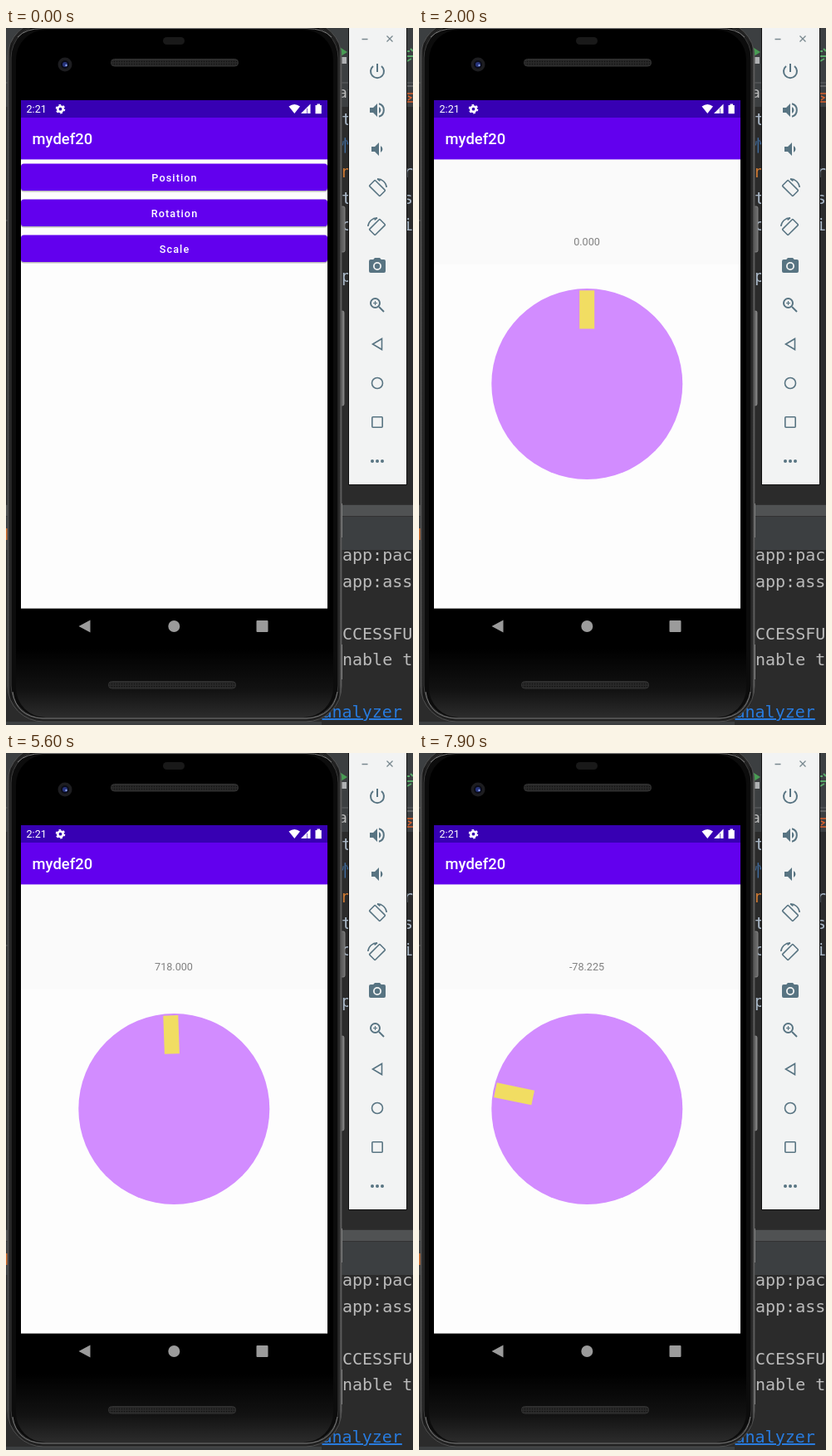
An HTML page that plays this animation: 490x840 px, repeating every 8000 ms.

```html
<!DOCTYPE html>
<html lang="en">
<head>
<meta charset="utf-8">
<title>Phone dial</title>
<style>
html, body { margin: 0; width: 100%; height: 100%; overflow: hidden; background: #2b2b2b; }
svg { display: block; width: 490px; height: 840px; }
text { font-family: Roboto, sans-serif; white-space: pre; }
.code text { font: 20px "DejaVu Sans Mono", monospace; }
.title { font-size: 18.4px; font-weight: 500; fill: #fff; }
.label { font-size: 12.6px; font-weight: 500; letter-spacing: 1.12px; fill: #fff; text-anchor: middle; }
.line { fill: none; stroke: #587482; stroke-width: 2; }
.thin { stroke-width: 1.6; }
</style>
</head>
<body>
<svg viewBox="0 0 490 840">
  <defs>
    <clipPath id="screen"><rect x="18" y="87" width="369" height="656"/></clipPath>
    <clipPath id="pressed"><rect x="18" y="206.5" width="369" height="33" rx="3.5"/></clipPath>
    <linearGradient id="rim">
      <stop offset="0" stop-color="#555"/><stop offset=".008" stop-color="#151515"/>
      <stop offset=".02" stop-color="#222"/><stop offset=".98" stop-color="#222"/>
      <stop offset=".992" stop-color="#161616"/><stop offset="1" stop-color="#777"/>
    </linearGradient>
    <linearGradient id="gloss" x2="0" y2="1">
      <stop offset=".9" stop-color="#000"/><stop offset=".96" stop-color="#121212"/>
      <stop offset="1" stop-color="#2c2c2c"/>
    </linearGradient>
    <pattern id="mesh" width="3" height="3" patternUnits="userSpaceOnUse">
      <rect width="3" height="3" fill="#292929"/><circle cx="1.5" cy="1.5" r=".8" fill="#111"/>
    </pattern>
    <g id="chrome">
      <rect x="18" y="87" width="369" height="21" fill="#3700b3"/>
      <rect x="18" y="108" width="369" height="50.4" fill="#6200ee"/>
      <rect x="18" y="699.6" width="369" height="43.4"/>
      <text class="title" x="31.6" y="140">mydef20</text>
    </g>
  </defs>

  <!-- editor behind the phone -->
  <g class="code">
    <rect width="490" height="840" fill="#2b2b2b"/>
    <rect width="490" height="95" fill="#3c3f41"/>
    <path d="M0 66H490M0 232H4" stroke="#606365"/>
    <path d="M400 22l11 7-11 7z" fill="#499c54"/>
    <rect x="404" y="35" width="6" height="8" fill="#afb1b3"/>
    <rect id="hover" x="483" y="56" width="7" height="39" fill="#4c5052"/>
    <path d="M483 28h3m1-3l3 3m-7 6h7m-7 6l5-3" stroke="#59a869" stroke-width="2"/>
    <path d="M483 70h7" stroke="#888"/>
    <path d="M483 79h7M483 89h7M484 82l4 2-4 3" stroke="#d9602b" stroke-width="1.5" fill="none"/>
    <text x="400" y="84" fill="#bbb" style="font-size:18px">av</text>
    <g fill="#a9b7c6">
      <text x="404" y="117">t</text>
      <text x="404" y="149" fill="#3f6b9d">惟</text>
      <text x="404" y="180" fill="#cc7832">n</text><text x="478" y="180">r</text>
      <text x="404" y="212">t</text><text x="478" y="212">s</text>
      <text x="404" y="244">c</text><text x="478" y="244">i</text>
      <text x="404" y="306">p</text>
    </g>
    <path d="M482 95v314" stroke="#3a3a3a" stroke-width="2"/>
    <rect y="574" width="490" height="14" fill="#505253"/>
    <rect y="588" width="490" height="41" fill="#3c3f41"/>
    <path d="M0 574.5H490M0 588.5H490" stroke="#323232"/>
    <path d="M404.5 573v41M404.5 743v42" stroke="#aaa"/>
    <g fill="#bbb">
      <text x="405" y="642">app:pac</text>
      <text x="405" y="674">app:ass</text>
      <text x="405" y="737">CCESSFU</text>
      <text x="405" y="768">nable t</text>
      <text x="380.5" y="831" fill="#287bde" text-decoration="underline">analyzer</text>
    </g>
    <rect y="836" width="380" height="4" fill="#3c3f41"/>
    <rect y="603" width="3" height="14" fill="#cc6a2b"/>
  </g>

  <!-- phone body -->
  <rect x="402" y="215" width="6" height="55" rx="2" fill="#666" stroke="#999" stroke-width=".7"/>
  <rect x="402" y="341" width="5" height="114" rx="2" fill="#777" stroke="#999" stroke-width=".7"/>
  <rect x="2" y="-8" width="402" height="844" rx="43" fill="url(#rim)" stroke="#505050"/>
  <rect x="6" y="-4" width="394" height="836" rx="40" fill="#0c0c0c" stroke="#3c3c3c"/>
  <rect x="12" y="2" width="382" height="829" rx="36" fill="url(#gloss)"/>
  <path d="M8 800Q12 830 44 832H362Q394 830 399 800M14 11Q24 .5 44 .5H362Q382 .5 392 11" fill="none" stroke="#777"/>
  <rect x="189" y="11" width="26" height="9" rx="4.5" fill="#191919"/>
  <circle cx="71" cy="44" r="8.5" fill="#1d1d20"/>
  <circle cx="71" cy="44" r="5" fill="#0b0c18"/>
  <circle cx="71" cy="44" r="3" fill="#27347c"/>
  <circle cx="72.5" cy="45" r="1.2" fill="#8fa5e8"/>
  <g fill="url(#mesh)" stroke="#333">
    <rect x="126.5" y="37.5" width="153" height="8.5" rx="4"/>
    <rect x="123.5" y="787.5" width="153" height="8.5" rx="4"/>
  </g>

  <!-- app screens -->
  <g clip-path="url(#screen)">
    <g id="menu">
      <rect x="18" y="87" width="369" height="656" fill="#fdfdfd"/>
      <use href="#chrome"/>
      <g id="buttons"></g>
      <circle id="ripple" cx="202.5" cy="223" fill="#fff" clip-path="url(#pressed)"/>
    </g>
    <g id="dial">
      <rect x="18" y="87" width="369" height="656" fill="#fdfdfd"/>
      <rect x="18" y="158" width="369" height="127" fill="#fafafa"/>
      <use href="#chrome"/>
      <text id="value" x="202" y="261.5" text-anchor="middle" font-size="12.6" fill="#808080"></text>
      <circle cx="202.3" cy="429" r="115" fill="#d28cff"/>
      <rect id="bar" x="193.2" y="316.3" width="18" height="46.2" fill="#f1dd62"/>
    </g>
  </g>

  <!-- system icons -->
  <g fill="#fff">
    <text x="24.5" y="102.3" font-size="12.6">2:21</text>
    <circle cx="65.5" cy="97.7" r="3.2" fill="none" stroke="#fff" stroke-width="2.6"/>
    <circle cx="65.5" cy="97.7" r="5" fill="none" stroke="#fff" stroke-width="1.6" stroke-dasharray="2.62"/>
    <path d="M340.5 94.5Q347.3 89.5 354 94.5L347.3 103zM355 103L366.5 91.5V103zM372.5 93h2v-1.5h3.5v1.5h1.8v10.3h-7.3z"/>
    <path d="M362.5 97v6" stroke="#7a5bc9"/>
  </g>
  <g fill="#9b9b9b">
    <path d="M87.5 721L101.5 713.5V728.5z"/>
    <circle cx="202.3" cy="721" r="7"/>
    <rect x="301.5" y="714" width="14" height="14" rx="1"/>
  </g>

  <!-- emulator tool strip -->
  <rect x="412.5" y="-1" width="70" height="551.5" fill="#f2f3f3" stroke="#111"/>
  <path d="M428.5 13.5h7M458.5 9.5l7 7m0-7l-7 7" stroke="#78888f" stroke-width="1.3"/>
  <g id="tools" fill="#587482"></g>
</svg>
<script>
const $ = id => document.getElementById(id);

$('buttons').innerHTML = ['Position', 'Rotation', 'Scale'].map((name, i) => {
  const y = 163.5 + 43 * i;
  return `<rect x="18" y="${y + 1}" width="369" height="33" rx="3.5" fill="#bbb"/>
    <rect x="18" y="${y}" width="369" height="32.5" rx="3.5" fill="#6200ee"/>
    <text class="label" x="203" y="${y + 21.5}">${name}</text>`;
}).join('');

// 24-unit icons, stacked 47 px apart
const phoneTilt = `<rect class="line thin" x="7.1" y="3.1" width="9.8" height="17.8" rx="1" transform="rotate(-45 12 12)"/>
  <path class="line thin" d="M12 .8A11.2 11.2 0 0 1 23.2 11M12 .8l3.4 2.6"/>`;
const icons = [
  '<path class="line" d="M12 3v10M7 6A8 8 0 1 0 17 6"/>',
  '<path d="M3 9v6h4l5 5V4L7 9zM14 8v8a4.5 4.5 0 0 0 0-8z"/><path class="line" d="M14 4.3a8 8 0 0 1 0 15.4"/>',
  '<path d="M5 9v6h4l5 5V4L9 9zM16 8v8a4.5 4.5 0 0 0 0-8z"/>',
  phoneTilt,
  `<g transform="matrix(-1 0 0 1 24 0)">${phoneTilt}</g>`,
  '<path d="M9 2L7.2 4H4a2 2 0 0 0-2 2v12a2 2 0 0 0 2 2h16a2 2 0 0 0 2-2V6a2 2 0 0 0-2-2h-3.2L15 2z"/><circle cx="12" cy="12" r="4.1" fill="none" stroke="#f2f3f3" stroke-width="1.8"/>',
  '<circle class="line" cx="9.5" cy="9.5" r="5.5"/><path class="line" d="M14 14l6 6"/><path class="line" style="stroke-width:1.2" d="M7 9.5h5M9.5 7v5"/>',
  '<path class="line thin" d="M6.5 12L17.5 5.5V18.5z"/>',
  '<circle class="line thin" cx="12" cy="12" r="6.5"/>',
  '<rect class="line thin" x="5.8" y="5.8" width="12.4" height="12.4" rx="1"/>',
  '<circle cx="6" cy="12" r="2"/><circle cx="12" cy="12" r="2"/><circle cx="18" cy="12" r="2"/>'
];
$('tools').innerHTML = icons.map((icon, i) => `<g transform="translate(435 ${40 + 47 * i})">${icon}</g>`).join('');

// [time, dial angle]
const turns = [
  [3900, 0], [4000, -.687], [4300, 8], [4400, 8], [4500, 28], [4600, 95], [4700, 190],
  [4800, 305], [4900, 429.27], [5000, 475], [5100, 492], [5200, 492], [5300, 510],
  [5500, 625], [6000, 1090], [6200, 1172.831], [6300, 1110], [6800, -60], [6900, -205],
  [7000, -253.214], [7100, -240.352], [7500, -240.352], [7600, -226], [7800, -118], [7900, -78.225]
];

function angleAt(t) {
  const i = turns.findIndex(([time]) => time >= t);
  if (i < 1) return i ? turns.at(-1)[1] : 0;
  const [t0, a0] = turns[i - 1], [t1, a1] = turns[i];
  return a0 + (a1 - a0) * (t - t0) / (t1 - t0);
}

const zoom = s => `translate(202.5 415) scale(${s}) translate(-202.5 -415)`;

function draw(now) {
  const t = Math.floor(now % 8000 / 100) * 100;
  const step = (t - 1700) / 100;
  const open = step < 0 ? 0 : [.043, .33, .97][step] ?? 1;
  const press = (t - 1300) / 100;

  $('hover').setAttribute('opacity', t >= 100 && t < 300 ? 1 : 0);
  $('ripple').setAttribute('r', Math.max(0, Math.min(190, press * 65)));
  $('ripple').setAttribute('opacity', press < 1 || press > 4 ? 0 : press < 4 ? .2 : .04);
  $('menu').setAttribute('transform', zoom(1 + .15 * open));
  $('dial').setAttribute('transform', zoom(.85 + .15 * open));
  $('dial').setAttribute('opacity', step < 1 ? 0 : step < 2 ? .25 : 1);

  const angle = angleAt(t);
  $('value').textContent = angle.toFixed(3);
  $('bar').setAttribute('transform', `rotate(${angle} 202.3 429)`);
  requestAnimationFrame(draw);
}
draw(0);
</script>
</body>
</html>
```
